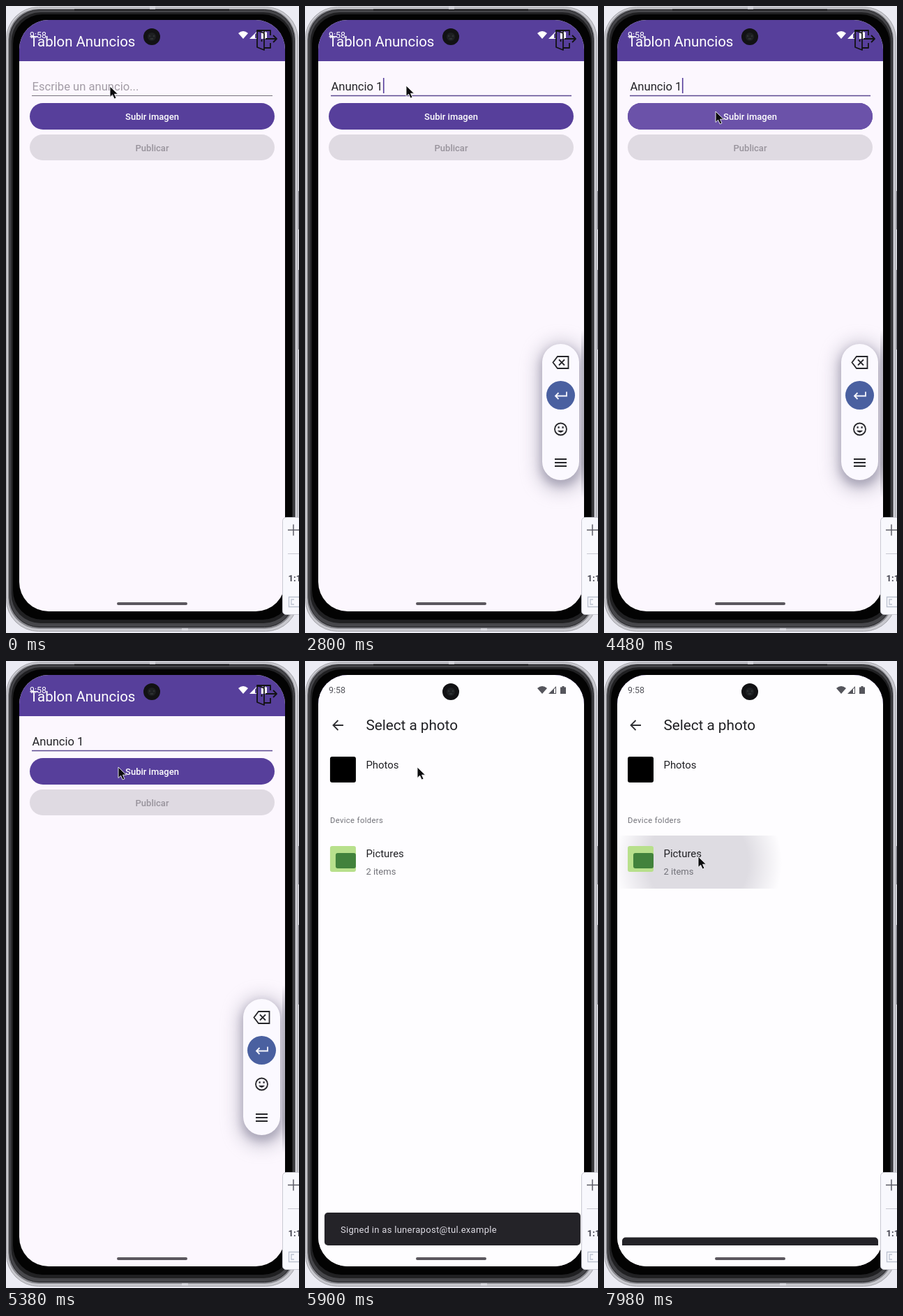
An HTML page for the animation above (8000 ms loop, 420x898 px).

```html
<!DOCTYPE html>
<html lang="es">
<head>
<meta charset="utf-8">
<title>Tablon</title>
<style>
  html, body { margin: 0; width: 100%; height: 100%; overflow: hidden; background: #ececf4; }
  svg { display: block; width: 420px; height: 898px; --main: #573f9b; }
  text { font-family: Roboto, "Noto Sans", sans-serif; white-space: pre; }
  .line { fill: none; stroke-width: 1.8; }
  .body { font-size: 14.9px; }
</style>
</head>
<body>
<svg viewBox="0 0 420 898">
  <defs>
    <clipPath id="screen"><rect x="19" y="20" width="381" height="847" rx="42"/></clipPath>
    <clipPath id="snackArea"><rect x="0" y="780" width="500" height="57"/></clipPath>
    <clipPath id="row"><rect x="19" y="250" width="381" height="76"/></clipPath>
    <clipPath id="button"><rect x="34" y="139" width="351" height="38" rx="19"/></clipPath>
    <filter id="glow" x="-100%" y="-50%" width="300%" height="200%"><feGaussianBlur stdDeviation="13"/></filter>
    <filter id="shade" x="-100%" y="-50%" width="300%" height="200%"><feGaussianBlur stdDeviation="6"/></filter>
    <radialGradient id="ripple">
      <stop offset=".6" stop-color="#dedce2"/>
      <stop offset="1" stop-color="#dedce2" stop-opacity="0"/>
    </radialGradient>
    <linearGradient id="smear" x2="0" y2="1">
      <stop offset="0" stop-color="#b4b1be" stop-opacity="0"/>
      <stop offset=".2" stop-color="#bcb9c6"/>
      <stop offset=".8" stop-color="#aeabb8"/>
      <stop offset="1" stop-color="#b4b1be" stop-opacity="0"/>
    </linearGradient>
  </defs>

  <!-- Phone body -->
  <rect width="420" height="898" fill="#ececf4"/>
  <path d="M419 265V320M419 378V492" stroke="#8a8a92" stroke-width="2"/>
  <rect x=".5" y="1.5" width="418" height="894" rx="46" fill="#c8c8ce" stroke="#a4a4aa"/>
  <rect x="3" y="4" width="412" height="888" rx="44" fill="#85858b"/>
  <rect x="5" y="5.5" width="408.500" height="884" rx="43" fill="#46464a" stroke="#242427"/>
  <rect x="7.500" y="9" width="404" height="875" rx="42" fill="#202022"/>
  <rect x="10" y="12" width="400" height="867" rx="42" fill="#030303"/>
  <path d="M98 5.500H320" stroke="#161618" stroke-width="2"/>
  <path d="M206 3H214M252 893H261" stroke="#dcdce2" stroke-width="3"/>

  <g clip-path="url(#screen)">
    <rect x="19" y="20" width="381" height="847" fill="#fcf7fe"/>

    <g id="board">
      <rect x="19" y="20" width="480" height="59" fill="var(--main)"/>
      <g id="lightStatus" fill="#fff"></g>
      <text x="34" y="58" font-size="20.400" fill="#fff">Tablon Anuncios</text>
      <g class="line" stroke="#121214" stroke-linejoin="round">
        <path d="M370 38V35H379V42M379 53V60H370M360 35L370 39V63L360 59ZM360 35H372M372 47H388M383 42L388 47L383 52M366.500 48V51"/>
      </g>
      <text id="field" x="37.500" y="121" font-size="16.600"></text>
      <rect id="caret" y="103" width="1.600" height="22" fill="var(--main)"/>
      <path id="underline" d="M37 128.500H382"/>
      <rect x="34" y="139" width="351" height="38" rx="19" fill="var(--main)"/>
      <g clip-path="url(#button)"><circle id="press" cx="165" cy="158" fill="#6b52a9"/></g>
      <rect x="34" y="184" width="351" height="37" rx="18.500" fill="#dfdae2"/>
      <g font-size="13" font-weight="500" text-anchor="middle">
        <text x="209.500" y="163" fill="#fff">Subir imagen</text>
        <text x="209.500" y="207.500" fill="#98939c">Publicar</text>
      </g>

      <g id="pill">
        <rect x="334" y="482" width="66" height="212" rx="32" fill="#8f8ba0" opacity=".5" filter="url(#glow)"/>
        <rect x="338" y="489" width="58" height="198" rx="28" fill="#8f8ba0" opacity=".5" filter="url(#shade)"/>
        <rect x="396" y="464" width="104" height="240" fill="url(#smear)"/>
        <rect x="340" y="484" width="53" height="195" rx="26.500" fill="#fbf9ff"/>
        <circle cx="366.500" cy="557.500" r="20.500" fill="#4a60a0"/>
        <g class="line" stroke="#26262a">
          <path d="M362 502H377.500V519H362L355.500 510.500ZM364 506.500L372 514.500M372 506.500L364 514.500"/>
          <circle cx="366.500" cy="606" r="8.500"/>
          <path d="M362 608Q366.500 614 371 608Z" fill="#26262a" stroke="none"/>
          <path d="M362.500 603.500H364.700M368.500 603.500H370.700" stroke-width="2.500"/>
          <path d="M358 649H375M358 654H375M358 659H375"/>
          <path d="M375 552.500V558.500H359M363.500 554L359 558.500L363.500 563" stroke="#f6f6fc"/>
        </g>
      </g>
    </g>

    <g id="picker">
      <rect x="-90" y="20" width="500" height="847" fill="#fefdff"/>
      <g clip-path="url(#row)"><circle id="rowRipple" cx="135" cy="288" fill="url(#ripple)"/></g>
      <path class="line" d="M53 92H38.500M45.500 85L38.500 92L45.500 99" stroke="#303034"/>
      <g fill="#202024">
        <text x="85.500" y="99" font-size="20.700">Select a photo</text>
        <text class="body" x="85.500" y="153.500">Photos</text>
        <text class="body" x="85.500" y="281">Pictures</text>
      </g>
      <g fill="#717178">
        <text x="34" y="231.500" font-size="11.200" letter-spacing=".4">Device folders</text>
        <text x="85.500" y="305.500" font-size="13">2 items</text>
      </g>
      <rect x="34" y="137" width="37" height="37" rx="3"/>
      <rect x="34" y="265" width="37" height="37" rx="3" fill="#b8e08c"/>
      <rect x="42" y="275" width="29" height="22" rx="3" fill="#42823c"/>
      <g clip-path="url(#snackArea)">
        <g id="snack">
          <rect x="26" y="790" width="367" height="47" rx="5" fill="#242328"/>
          <text x="49" y="818.500" font-size="13" letter-spacing=".3" fill="#dedce4">Signed in as lunerapost@tul.example</text>
        </g>
      </g>
    </g>

    <g id="darkStatus" fill="#55555c"></g>
    <rect id="nav" x="159" y="854" width="101" height="4" rx="2" fill="#5b575e"/>
  </g>

  <!-- Camera -->
  <circle cx="209" cy="44" r="12" fill="#121214"/>
  <circle cx="209" cy="44" r="6" fill="#1e2022"/>
  <path d="M205 43H207M211 43H213M207 47H211" stroke="#34383a" stroke-width="1.500"/>

  <!-- Zoom panel -->
  <rect x="396.500" y="732.500" width="40" height="139" rx="5" fill="#f8f8fd" stroke="#c9c9d2"/>
  <path d="M404 750.500H420M412 742.500V758.500" stroke="#5c5c66" stroke-width="1.500"/>
  <path d="M404 784.500H420" stroke="#c8c8d2"/>
  <text x="404.500" y="823.500" font-size="13" font-weight="700" fill="#444450">1:1</text>
  <path d="M424 846.500H405.500V860.500H424M409 854V850H413M413 857H409V854" fill="none" stroke="#bcc2d0" stroke-width="1.300"/>

  <path id="pointer" d="M0 0V15.500L3.600 12.200L6.200 18L9 16.800L6.500 11.200H11.500Z" fill="#0c0c0e" stroke="#f6f6fa" stroke-width=".9"/>
</svg>
<script>
const LOOP = 8000, OPEN = 5616, SHIFT = 89;
const $ = id => document.getElementById(id);
const set = (id, attrs) => {
  for (const name in attrs) $(id).setAttribute(name, attrs[name]);
};
const ramp = (t, start, length) => Math.min(1, Math.max(0, (t - start) / length));
const mix = (a, b, k) => a + (b - a) * k;

const statusBar = `<text x="34" y="45.500" font-size="12.400">9:58</text>
  <path d="M340 47L333 39Q340 33 347 39Z"/>
  <path d="M349 47L360 36V47ZM357 46H359V38.500L357 40.500Z" fill-rule="evenodd"/>
  <path d="M366 37.500H368.500V36H371.500V37.500H374V47H366Z"/>`;
$("lightStatus").innerHTML = $("darkStatus").innerHTML = statusBar;

const cubic = (a, b, c, d, k) => {
  const m = 1 - k;
  return m * m * m * a + 3 * m * m * k * b + 3 * m * k * k * c + k * k * k * d;
};
// Solves y for x on a Bezier given by its x and y coordinates
function curve(xs, ys, x) {
  let low = 0, high = 1;
  for (let i = 0; i < 24; i++) {
    const mid = (low + high) / 2;
    if (cubic(...xs, mid) < x) low = mid; else high = mid;
  }
  return cubic(...ys, low);
}
const emphasized = x => x < 1 / 6
  ? curve([0, .05, .1333, 1 / 6], [0, 0, .06, .4], x)
  : curve([1 / 6, .2083, .25, 1], [.4, .82, 1, 1], x);
const standard = x => curve([0, .4, .2, 1], [0, 0, 1, 1], x);

// Time, x, y
const path = [
  [0, 149, 115], [240, 149, 115], [340, 145, 114], [3500, 145, 114],
  [4150, 160, 151], [5200, 160, 151], [5400, 161, 152], [6150, 161, 152],
  [6660, 119, 262], [7100, 135, 280], [LOOP, 135, 280]
];
function pointerAt(t) {
  const i = path.findIndex(p => p[0] > t), [a, b] = [path[i - 1], path[i]];
  const k = ramp(t, a[0], b[0] - a[0]), s = k * k * (3 - 2 * k);
  return [mix(a[1], b[1], s), mix(a[2], b[2], s)];
}

const WORD = "Anuncio 1", FOCUS = 1110;
const keys = [1220, 1280, 1340, 1400, 1460, 1520, 1580, 1960, 2400];

function draw(t) {
  const typed = keys.filter(k => k <= t).length;
  const focused = t >= FOCUS;
  const lastKey = typed ? keys[typed - 1] : FOCUS;
  const field = $("field");
  field.textContent = typed ? WORD.slice(0, typed) : "Escribe un anuncio...";
  set("field", { fill: typed ? "#222226" : "#a39ca6" });
  set("caret", {
    x: 38 + (typed ? field.getComputedTextLength() : 0),
    opacity: focused && (t - lastKey) % 1000 < 500 ? 1 : 0
  });
  set("underline", { stroke: focused ? "#5b4a90" : "#77727c", "stroke-width": focused ? 1.6 : 1.1 });
  set("pill", { opacity: ramp(t, FOCUS, 120) });
  set("press", { r: mix(0, 230, ramp(t, 4380, 90)), opacity: 1 - ramp(t, 4900, 250) });

  const opening = t >= OPEN;
  const slide = emphasized(ramp(t, OPEN, 450)) * SHIFT;
  set("board", { transform: `translate(${-slide})` });
  set("picker", { transform: `translate(${SHIFT - slide})`, opacity: ramp(t, OPEN + 50, 83) });
  set("lightStatus", { opacity: opening ? 0 : 1 });
  set("darkStatus", { opacity: opening ? 1 : 0 });

  set("rowRipple", { r: mix(20, 120, standard(ramp(t, 7780, 200))), opacity: ramp(t, 7780, 75) });
  set("snack", { transform: `translate(0 ${47 * standard(ramp(t, 7860, 250))})` });
  set("pointer", { transform: `translate(${pointerAt(t)})` });
}

const began = performance.now();
function tick() {
  draw((performance.now() - began) % LOOP);
  requestAnimationFrame(tick);
}
tick();
</script>
</body>
</html>
```
